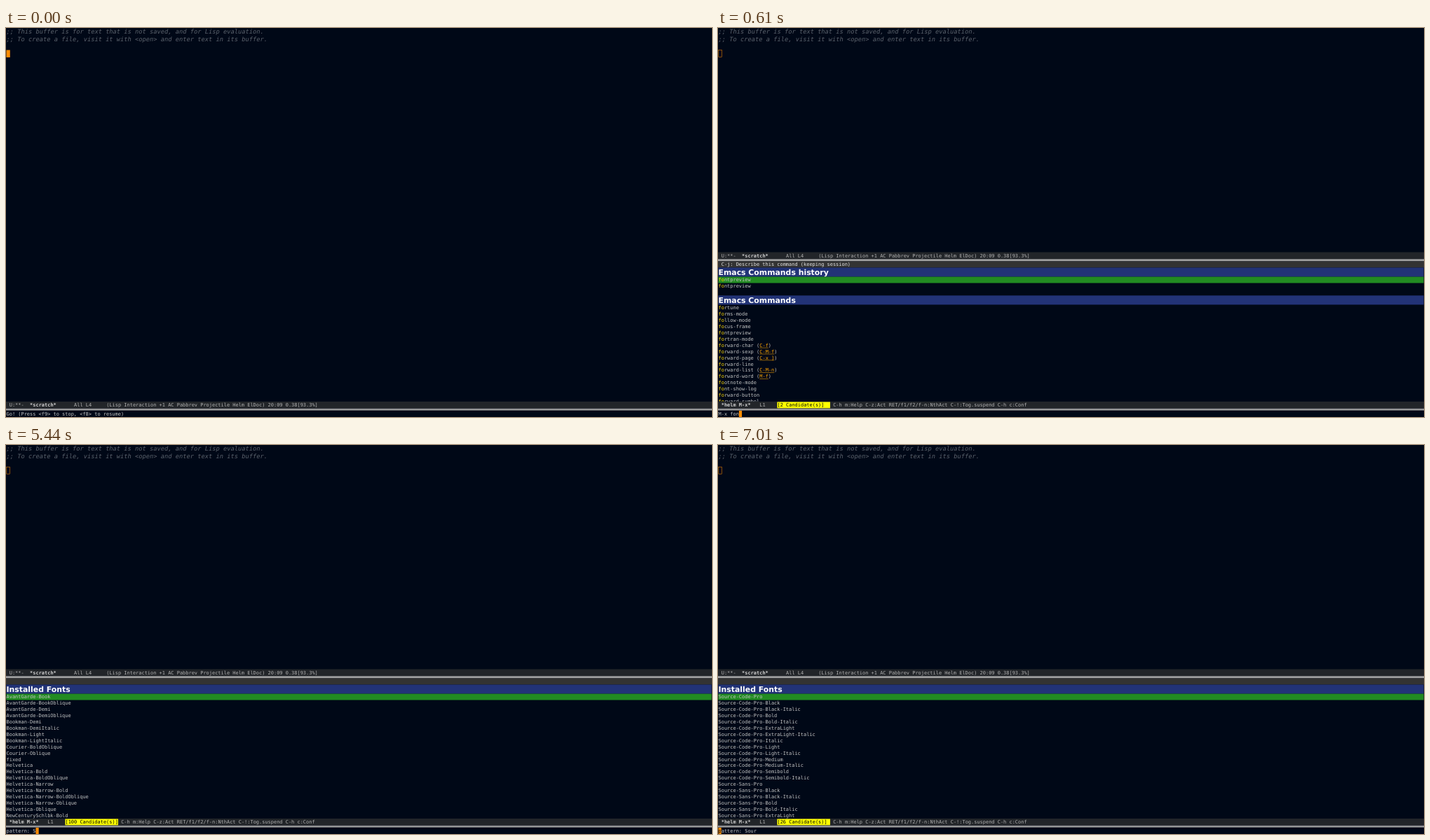
These frames come from a looping animation (1007 by 556 pixels, 8 s). An HTML page with a canvas:

```html
<!DOCTYPE html>
<html lang="en">
<head>
<meta charset="utf-8">
<title>Font preview in Emacs</title>
<style>
  html, body { margin: 0; width: 100%; height: 100%; overflow: hidden; background: #000817; }
  canvas { display: block; }
</style>
</head>
<body>
<canvas id="stage" width="1007" height="556"></canvas>
<script>
const ctx = document.getElementById('stage').getContext('2d');
const LOOP = 8000;

// Everything is laid out on a 1920 x 1060 screen with 8 x 17 character cells.
const WIDTH = 1920, ROW = 17, CELL = 8, TITLE = 25, BAR = 19, DIVIDER = 6;
const MIDDLE_BAR = 611, BOTTOM_BAR = 1018;

const MONO = '"DejaVu Sans Mono", monospace';
const FONT = {
  normal: `13.288px ${MONO}`,
  bold: `bold 13.288px ${MONO}`,
  comment: `italic 16.61px ${MONO}`,
  title: 'bold 20.75px "DejaVu Sans", sans-serif'
};
const COLOR = {
  back: '#000817', text: '#c4c4c4', comment: '#5b626c', cursor: '#ff8c00',
  bar: '#222529', barText: '#b2b2b2', header: '#333333', title: '#223377',
  selected: '#228b22', match: '#ffd700', key: '#ffa500', count: '#ffff00'
};

const words = text => text.trim().split(/\s*\n\s*/);

const history = words(`gif-screencast
  fontpreview
  gif-screencast
  magit
  dired (C-x d)
  fontpreview
  gif-screencast
  text-scale-increase`);
const fontHistory = ['fontpreview', 'fontpreview'];

const allCommands = words(`enable-theme
  magit-submodule-update
  url-setup-privacy-info
  flycheck-next-error
  dired-backup-diff
  gnus-summary-recenter
  dired-at-point
  emms-playlist-limit-to-info-performer
  bibtex-SuppCollection
  digit-argument (C-9)`);
const foCommands = words(`fortune
  forms-mode
  follow-mode
  focus-frame
  fontpreview
  fortran-mode
  forward-char (C-f)
  forward-sexp (C-M-f)
  forward-page (C-x ])
  forward-line
  forward-list (C-M-n)
  forward-word (M-f)
  footnote-mode
  font-show-log
  forward-button
  forward-symbol`);
const fontCommands = words(`fontpreview
  font-show-log
  font-lock-mode
  fontpreview-mode
  fontpreview-quit
  fontpreview-next-font
  fontpreview-copy-face
  font-lock-fontify-block (M-o M-o)
  font-lock-fontify-buffer
  fontpreview-set-frame-font
  fontpreview-copy-font-name
  fontpreview-copy-font-path
  fontpreview-change-font-size
  fontpreview-change-preview-text
  fontpreview-change-foreground-color
  fontpreview-change-background-color`);

const allFonts = words(`AvantGarde-Book
  AvantGarde-BookOblique
  AvantGarde-Demi
  AvantGarde-DemiOblique
  Bookman-Demi
  Bookman-DemiItalic
  Bookman-Light
  Bookman-LightItalic
  Courier-BoldOblique
  Courier-Oblique
  fixed
  Helvetica
  Helvetica-Bold
  Helvetica-BoldOblique
  Helvetica-Narrow
  Helvetica-Narrow-Bold
  Helvetica-Narrow-BoldOblique
  Helvetica-Narrow-Oblique
  Helvetica-Oblique
  NewCenturySchlbk-Bold`);
const withItalic = (family, weights) => weights.flatMap(w => [`${family}-${w}`, `${family}-${w}-Italic`]);
const sourceFonts = [
  'Source-Code-Pro',
  ...withItalic('Source-Code-Pro', ['Black', 'Bold', 'ExtraLight']),
  'Source-Code-Pro-Italic',
  ...withItalic('Source-Code-Pro', ['Light', 'Medium', 'Semibold']),
  'Source-Sans-Pro',
  ...withItalic('Source-Sans-Pro', ['Black', 'Bold', 'ExtraLight'])
];
const noto = name => `Noto-Sans-${name}-Regular`;
const southArabian = noto('Old-South-Arabian');
const soFonts = [noto('Old-Sogdian'), southArabian, noto('Sora-Sompeng'), ...sourceFonts];
const sFonts = [
  ...['Bold', 'BoldItalic', 'Italic', 'Roman'].map(style => `NewCenturySchlbk-${style}`),
  ...words(`Adlam
    Armenian
    Avestan
    Balinese
    Bamum
    Batak
    Bengali
    Brahmi
    Buginese
    Buhid
    Carian
    Chakma
    Cham
    Cherokee
    Coptic
    Cuneiform`).map(noto)
];

// The lists lag one key behind the typed pattern.
const commands = (at, input, past, list, match, cursor) => ({
  at, prompt: 'M-x ' + input, cursor, match, count: past.length,
  header: 'C-j: Describe this command (keeping session)',
  sections: [['Emacs Commands history', past], ['Emacs Commands', list]]
});
const fonts = (at, input, list, count, cursor) => ({
  at, prompt: 'pattern: ' + input, cursor, count, header: '',
  sections: [['Installed Fonts', list]]
});
const states = [
  { at: 0, prompt: 'Go! (Press <f9> to stop, <f8> to resume)' },
  commands(370, 'f', history, allCommands),
  commands(520, 'fo', fontHistory, foCommands, 'f'),
  commands(610, 'fon', fontHistory, foCommands, 'fo'),
  commands(770, 'font', fontHistory, fontCommands, 'fon'),
  commands(2190, 'font', fontHistory, fontCommands, 'font', 0),
  fonts(5440, 'S', allFonts, 100),
  fonts(5560, 'So', sFonts, 81),
  fonts(5690, 'Sou', soFonts, 29),
  fonts(5850, 'Sour', [southArabian, ...sourceFonts], 27),
  fonts(7010, 'Sour', sourceFonts, 26, 0)
];

function box(x, y, w, h, color) {
  ctx.fillStyle = color;
  ctx.fillRect(x, y, w, h);
}

function write(text, x, baseline, color, font = FONT.normal) {
  ctx.font = font;
  ctx.fillStyle = color;
  ctx.fillText(text, x, baseline);
}

const cellX = column => 1 + column * CELL;

function modeLine(y, parts) {
  box(0, y, WIDTH, BAR, COLOR.bar);
  box(0, y + BAR, WIDTH, 1, '#cccccc');
  box(0, y + BAR + 1, WIDTH, DIVIDER - 2, '#a0a0a0');
  box(0, y + BAR + DIVIDER - 1, WIDTH, 1, '#666666');
  for (const [column, text, color = COLOR.barText, font] of parts)
    write(text, cellX(column), y + 14, color, font);
}

function scratchBar(y) {
  modeLine(y, [
    [1, 'U:**-'],
    [8, '*scratch*', '#d0d0d0', FONT.bold],
    [23, 'All L4'],
    [34, '(Lisp Interaction +1 AC Pabbrev Projectile Helm ElDoc) 20:09 0.38[93.3%]']
  ]);
}

function helmBar(count) {
  modeLine(BOTTOM_BAR, [
    [1, '*helm M-x*', '#d0d0d0', FONT.bold],
    [14, 'L1'],
    [39, 'C-h m:Help C-z:Act RET/f1/f2/f-n:NthAct C-!:Tog.suspend C-h c:Conf']
  ]);
  box(cellX(20), BOTTOM_BAR + 1, 18 * CELL, ROW, COLOR.count);
  write(`[${count} Candidate(s)]`, cellX(20), BOTTOM_BAR + 14, '#000');
}

function candidate(text, y, match) {
  const [, name, open = '', key = '', close = ''] = text.match(/^(\S+)(?:( \()(.*)(\)))?$/);
  const pieces = match ? name.split(new RegExp(`(${match})`)) : [name];
  let column = 0;
  const put = (piece, color) => {
    write(piece, cellX(column), y + 13, color);
    column += piece.length;
  };
  for (const piece of pieces) put(piece, piece === match ? COLOR.match : COLOR.text);
  put(open, COLOR.text);
  box(cellX(column), y + 15, key.length * CELL, 1, COLOR.key);
  put(key, COLOR.key);
  put(close, COLOR.text);
}

function helmWindow({ header, sections, match, count }) {
  let y = MIDDLE_BAR + BAR + DIVIDER;
  box(0, y, WIDTH, ROW, COLOR.header);
  write(header, cellX(1), y + 13, '#e5e5e5');
  y += ROW;
  sections.forEach(([title, list], index) => {
    if (index) y += ROW;
    box(1, y, WIDTH - 2, TITLE, COLOR.title);
    write(title, 1, y + 20, '#fff', FONT.title);
    y += TITLE;
    if (!index) box(1, y, WIDTH - 2, ROW, COLOR.selected);
    for (const text of list) {
      if (y < BOTTOM_BAR) candidate(text, y, match);
      y += ROW;
    }
  });
  helmBar(count);
}

function minibuffer({ prompt, sections, cursor = prompt.length }) {
  const y = BOTTOM_BAR + BAR + DIVIDER;
  box(0, y, WIDTH, ROW, COLOR.back);
  write(prompt, 1, y + 13, COLOR.text);
  if (!sections) return;
  box(cellX(cursor), y, CELL, ROW, COLOR.cursor);
  write(prompt.charAt(cursor), cellX(cursor), y + 13, COLOR.back);
}

function draw(state) {
  const scale = 1007 / WIDTH;
  ctx.setTransform(scale, 0, 0, scale, 0, 0);
  ctx.textRendering = 'geometricPrecision';
  box(0, 0, WIDTH, 1061, COLOR.back);
  write(';; This buffer is for text that is not saved, and for Lisp evaluation.', 1, 16, COLOR.comment, FONT.comment);
  write(';; To create a file, visit it with <open> and enter text in its buffer.', 1, 36, COLOR.comment, FONT.comment);
  if (state.sections) {
    ctx.strokeStyle = COLOR.cursor;
    ctx.lineWidth = 1;
    ctx.strokeRect(1.5, 60.5, 9, 19);
    scratchBar(MIDDLE_BAR);
    helmWindow(state);
  } else {
    box(1, 60, 10, 20, COLOR.cursor);
    scratchBar(BOTTOM_BAR);
  }
  minibuffer(state);
}

const start = performance.now();
let shown;
function tick() {
  const time = (performance.now() - start) % LOOP;
  const state = states.findLast(s => s.at <= time);
  if (state !== shown) draw(shown = state);
  requestAnimationFrame(tick);
}
tick();
</script>
</body>
</html>
```
